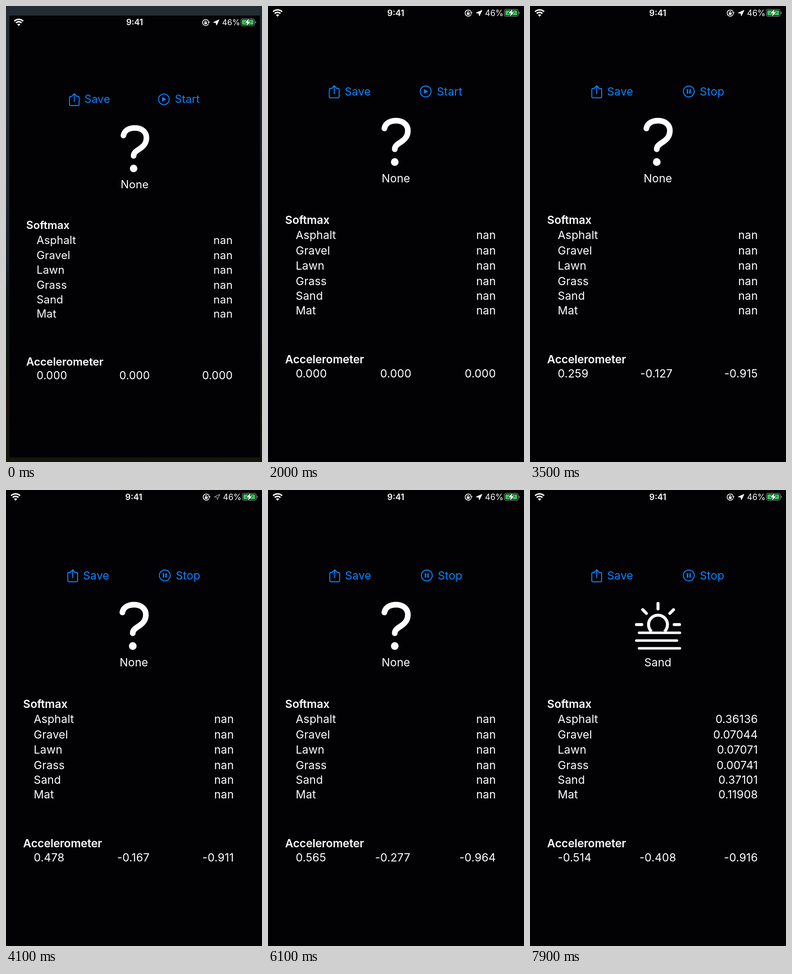
Animation of 561 by 998 pixels, one loop 8000 ms. Source, as an HTML page:

```html
<!DOCTYPE html>
<html lang="en">
<head>
<meta charset="utf-8">
<title>Surface classifier</title>
<style>
  html, body { margin: 0; width: 100%; height: 100%; overflow: hidden; background: #020104; }
  svg { display: block; width: 561px; height: 998px; }
  text { font: 400 24.5px Inter, "Open Sans", sans-serif; letter-spacing: .15px; fill: #fff; }
  .head { font-weight: 600; letter-spacing: -.15px; }
  .end { text-anchor: end; }
  .mid { text-anchor: middle; }
  .bar text { font-size: 18px; letter-spacing: 0; }
  .bar .clock { font-size: 18.5px; font-weight: 600; }
  .line { fill: none; stroke: #fff; }
  .round { stroke-linecap: round; stroke-linejoin: round; }
  .blue text { fill: #0a84ff; }
  .blue .line { stroke: #0a84ff; stroke-width: 2.1; }
  .blue .solid { fill: #0a84ff; }
</style>
</head>
<body>
<svg viewBox="0 0 561 998">
  <defs>
    <linearGradient id="dusk" x1="0" y1="0" x2="0" y2="1">
      <stop offset="0" stop-color="#232c33"/>
      <stop offset=".45" stop-color="#1b262d"/>
      <stop offset=".56" stop-color="#15212a"/>
      <stop offset=".63" stop-color="#0d1915"/>
      <stop offset=".76" stop-color="#0f1712"/>
      <stop offset=".86" stop-color="#17130d"/>
      <stop offset="1" stop-color="#15170d"/>
    </linearGradient>
  </defs>
  <rect width="561" height="998" fill="url(#dusk)"/>
  <rect id="panel" fill="#020104"/>

  <g id="app">
    <g class="bar">
      <g class="line" stroke-width="3.2">
        <path d="M11.1 12.4A14.5 14.5 0 0 1 30.9 12.4"/>
        <path d="M14.7 16.3A9.2 9.2 0 0 1 27.3 16.3"/>
      </g>
      <path d="M21 23.6L17.4 19.6A5.2 5.2 0 0 1 24.6 19.6Z" fill="#fff"/>
      <text class="mid clock" x="280" y="22">9:41</text>

      <path class="line" d="M445.3 18A6.8 6.8 0 1 1 445.4 13.4" stroke-width="1.6"/>
      <path d="M442.8 14H448.4L445.8 17.6Z" fill="#fff"/>
      <rect x="435.8" y="14.8" width="6" height="4.6" rx=".8" fill="#fff"/>
      <path class="line" d="M437 15V13.7A1.8 1.8 0 0 1 440.6 13.7V15" stroke-width="1.2"/>

      <path id="compass" class="round" d="M468.7 9.6L463.2 21.2L462.2 16.1L456.6 15.2Z" stroke="#fff" stroke-width="1.3" fill="#fff"/>
      <text x="475.5" y="22">46%</text>

      <rect class="line" x="517.8" y="7.3" width="30.4" height="15.4" rx="4" style="stroke:#8a8a8e" stroke-width="1.3"/>
      <path d="M549.8 12.3Q551.8 13 551.8 15T549.8 17.7Z" fill="#8a8a8e"/>
      <rect x="520" y="9.4" width="26" height="11.2" rx="2.2" fill="#34c759"/>
      <path d="M535.8 6.6L526.6 16.3H532L530 23.4L539.6 13.5H534Z" fill="#fff" stroke="#000" stroke-width="1.5" paint-order="stroke"/>
    </g>

    <g class="blue">
      <g id="save">
        <path class="line round" d="M140.4 180.4H137.4Q134.4 180.4 134.4 183.4V198Q134.4 201 137.4 201H153Q156 201 156 198V183.4Q156 180.4 153 180.4H150M145.2 192V174.8M140.6 179.2L145.2 174.6L149.8 179.2"/>
        <text x="168" y="195.5">Save</text>
      </g>
      <g id="start">
        <circle class="line" cx="345.5" cy="187" r="11.9"/>
        <path class="solid round" d="M342.4 182.6L350 187L342.4 191.4Z" stroke="#0a84ff"/>
        <text x="370" y="195.5">Start</text>
      </g>
      <g id="stop">
        <circle class="line" cx="348" cy="187" r="11.9"/>
        <rect class="solid" x="343.6" y="182.3" width="3.2" height="9.4" rx=".6"/>
        <rect class="solid" x="349.2" y="182.3" width="3.2" height="9.4" rx=".6"/>
        <text x="372" y="195.5">Stop</text>
      </g>
    </g>

    <g id="unknown">
      <path class="line round" d="M255 268C257 257.500 266 251 281 251C296 251 306.500 260 306.500 273C306.500 284 301.500 291 291.500 297.500C281.500 304 277.800 307 277.800 313.600" stroke-width="12.4"/>
      <circle cx="277.8" cy="341.5" r="8.4" fill="#fff"/>
    </g>
    <g id="sand" class="line round" stroke-width="6.6">
      <path d="M280.5 248.300V260.300M247 262L255 270M314.500 262L306.500 270M233.300 294.500H245M316 294.500H327.700"/>
      <path d="M266.500 310A20.700 20.700 0 1 1 294.500 310" stroke-linecap="butt"/>
      <path d="M239 312.500H328.500M233 329.500H322M239 346.500H328.500" stroke-width="5.6"/>
    </g>
    <text id="label" class="mid" x="280.2" y="385.5"></text>

    <text class="head" x="37.6" y="477">Softmax</text>
    <g id="rows"></g>
    <text class="head" x="37.6" y="782">Accelerometer</text>
    <text id="ax" x="60.8" y="812.7"></text>
    <text id="ay" class="mid" y="812.7"></text>
    <text id="az" class="end" x="499.3" y="812.7"></text>
  </g>
</svg>
<script>
const LOOP = 8000, STEP = 100;
const ZOOM_END = 600, RUN = 2400, RESULT = 7000;
const LEFT = 60.8, RIGHT = 499.3;

const surfaces = [
  ['Asphalt', '0.36136', 510], ['Gravel', '0.07044', 543.5], ['Lawn', '0.07071', 577],
  ['Grass', '0.00741', 610.5], ['Sand', '0.37101', 643], ['Mat', '0.11908', 675]
];

// time, x, y, z
const readings = [
  [RUN, -0.021, -0.008, -0.991],
  [2800, -0.057, -0.013, -0.984],
  [4100, 0.478, -0.167, -0.911],
  [4900, 0.447, -0.233, -0.965],
  [6100, 0.565, -0.277, -0.964],
  [7900, -0.514, -0.408, -0.916]
];

const $ = id => document.getElementById(id);
const clamp = v => Math.min(1, Math.max(0, v));
const mix = (a, b, p) => a + (b - a) * p;
const ramp = (t, from, to) => clamp((t - from) / (to - from));
const show = (id, on) => { $(id).style.display = on ? '' : 'none'; };
const put = (el, s) => { if (el.textContent !== s) el.textContent = s; };

function addText(x, y, cls, content) {
  const el = document.createElementNS('http://www.w3.org/2000/svg', 'text');
  el.setAttribute('x', x);
  el.setAttribute('y', y);
  el.setAttribute('class', cls);
  el.textContent = content;
  return $('rows').appendChild(el);
}

const scores = surfaces.map(([name, , y]) => {
  addText(LEFT, y, '', name);
  return addText(RIGHT, y, 'end', 'nan');
});

function acceleration(t) {
  if (t < RUN) return [0, 0, 0];
  let i = 0;
  while (i < readings.length - 2 && t >= readings[i + 1][0]) i++;
  const a = readings[i], b = readings[i + 1];
  const p = ramp(t, a[0], b[0]), ease = p * p * (3 - 2 * p);
  // hand tremor that dies out at each known reading
  return [1, 2, 3].map(k =>
    mix(a[k], b[k], ease) + 0.03 * Math.sin(Math.PI * p) * Math.sin(t * 0.013 * k + k));
}

function zoom(t) {
  const p = 1 - Math.pow(1 - ramp(t, 0, ZOOM_END), 3);
  const panel = { x: mix(7.5, 0, p), y: mix(21, 0, p), width: mix(549, 561, p), height: mix(967, 998, p) };
  for (const k in panel) $('panel').setAttribute(k, panel[k]);
  $('app').setAttribute('transform',
    `translate(${mix(7.4, 0, p)} ${mix(20.9, 0, p)}) scale(${mix(0.98, 1, p)})`);
}

function render(t) {
  zoom(t);
  const running = t >= RUN, known = t >= RESULT;
  $('save').setAttribute('transform', `translate(${running ? 1 : 0} 0)`);
  show('start', !running);
  show('stop', running);
  show('unknown', !known);
  show('sand', known);
  put($('label'), known ? 'Sand' : 'None');
  scores.forEach((el, i) => put(el, known ? surfaces[i][1] : 'nan'));

  const filled = t < 5000 ? 1 - ramp(t, 3800, 4000) : ramp(t, 5600, 5800);
  $('compass').setAttribute('fill-opacity', filled);
  $('compass').setAttribute('stroke-opacity',
    t < 4100 ? mix(1, 0.6, ramp(t, 3800, 4100)) : mix(0.6, 1, ramp(t, 4100, 4500)));

  const [x, y, z] = acceleration(t).map(v => v.toFixed(3));
  put($('ax'), x);
  put($('ay'), y);
  put($('az'), z);
  const from = LEFT + $('ax').getComputedTextLength();
  const to = RIGHT - $('az').getComputedTextLength();
  $('ay').setAttribute('x', (from + to) / 2);
}

function tick() {
  const t = performance.now() % LOOP;
  render(Math.floor(t / STEP) * STEP);
  requestAnimationFrame(tick);
}
tick();
</script>
</body>
</html>
```
